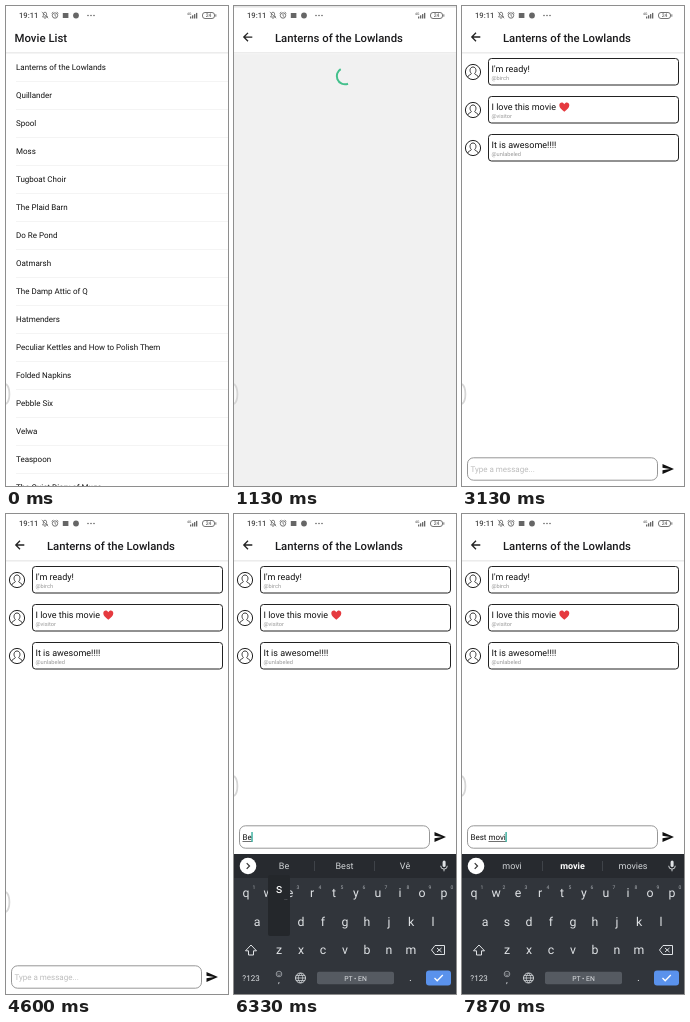
These frames come from a looping animation (222x480 px, 8 s). An HTML page with a canvas:

```html
<!DOCTYPE html>
<html lang="en">
<head>
<meta charset="utf-8">
<title>Movie chat</title>
<style>
html, body { margin: 0; width: 100%; height: 100%; overflow: hidden; background: #fff; }
canvas { display: block; width: 222px; height: 480px; }
</style>
</head>
<body>
<canvas id="stage"></canvas>
<script>
const W = 222, H = 480, LOOP = 8000;
const stage = document.getElementById('stage');
const c = stage.getContext('2d');
const dpr = window.devicePixelRatio || 1;
stage.width = W * dpr;
stage.height = H * dpr;
c.textRendering = 'geometricPrecision';

const movies = ['Lanterns of the Lowlands', 'Quillander', 'Spool', 'Moss', 'Tugboat Choir',
  'The Plaid Barn', 'Do Re Pond', 'Oatmarsh', 'The Damp Attic of Q', 'Hatmenders',
  'Peculiar Kettles and How to Polish Them', 'Folded Napkins', 'Pebble Six', 'Velwa',
  'Teaspoon', 'The Quiet Diary of Mugs'];
const messages = [["I'm ready!", '@birch'], ['I love this movie', '@visitor'],
  ['It is awesome!!!!', '@unlabeled']];
const keyRows = [['qwertyuiop', 12, 379], ['asdfghjkl', 23, 408], ['zxcvbnm', 45, 436]];

// [time, text in the field, three suggestions]
const typing = [
  [0, ''],
  [5930, 'B', 'B', 'Bom', 'Boa'],
  [6130, 'Be', 'Be', 'Best', 'Vê'],
  [6400, 'Bes', 'Bes', 'Best', 'Bem'],
  [6600, 'Best', 'Best', 'Beat', 'Rest'],
  [6800, 'Best ', 'of', 'friend', 'way'],
  [7200, 'Best m', 'm', 'me', 'my'],
  [7470, 'Best mo', 'mo', 'more', 'most'],
  [7730, 'Best mov', 'mov', 'move', 'movie'],
  [7870, 'Best movi', 'movi', 'movie', 'movies']
];
// [down, up, key]
const presses = [[5870, 5930, 'b'], [6070, 6130, 'e'], [6270, 6400, 's'], [6530, 6600, 't'],
  [6730, 6800, ' '], [7130, 7200, 'm'], [7330, 7470, 'o'], [7670, 7730, 'v'], [7800, 7870, 'i']];

const clamp = (v, a = 0, b = 1) => Math.min(b, Math.max(a, v));
const smooth = x => x * x * (3 - 2 * x);

function bezier(x, x1, y1, x2, y2) {
  const at = (s, a, b) => 3 * s * (1 - s) ** 2 * a + 3 * s * s * (1 - s) * b + s ** 3;
  let lo = 0, hi = 1;
  for (let i = 0; i < 24; i++) {
    const mid = (lo + hi) / 2;
    if (at(mid, x1, x2) < x) lo = mid; else hi = mid;
  }
  return at(lo, y1, y2);
}

function rect(x, y, w, h, color) {
  c.fillStyle = color;
  c.fillRect(x, y, w, h);
}

function paint(fill, stroke, width = 1) {
  if (fill) { c.fillStyle = fill; c.fill(); }
  if (stroke) { c.strokeStyle = stroke; c.lineWidth = width; c.stroke(); }
}

function round(x, y, w, h, r, fill, stroke, width) {
  c.beginPath();
  c.roundRect(x, y, w, h, r);
  paint(fill, stroke, width);
}

function circle(x, y, r, fill, stroke, width) {
  c.beginPath();
  c.arc(x, y, r, 0, 2 * Math.PI);
  paint(fill, stroke, width);
}

function path(d, x, y, fill, stroke, width) {
  c.save();
  c.translate(x, y);
  const p = new Path2D(d);
  if (fill) { c.fillStyle = fill; c.fill(p); }
  if (stroke) { c.strokeStyle = stroke; c.lineWidth = width || 1; c.stroke(p); }
  c.restore();
}

function text(s, x, y, size, color, align = 'left', weight = 400) {
  c.font = `${weight} ${size}px Roboto, sans-serif`;
  c.textAlign = align;
  c.fillStyle = color;
  c.fillText(s, x, y);
}

function statusBar() {
  const ink = '#666';
  text('19:11', 13, 12, 7.6, '#444', 'left', 500);
  path('M-2.5 2H2.5L1.6 .6V-1A1.6 1.8 0 0 0 -1.6 -1V.6ZM-.8 3.2H.8M-3.2 -3L3.2 3.2', 39, 9, null, ink, 0.8);
  circle(49, 9.5, 2.7, null, ink, 0.9);
  path('M0 -1.5V.3L1.2 1M-3.4 -2L-1.8 -3.5M3.4 -2L1.8 -3.5', 49, 9.5, null, ink, 0.8);
  rect(56.8, 7, 5.6, 5, ink);
  circle(70, 9.5, 2.9, ink);
  for (let i = 0; i < 3; i++) circle(82 + i * 3, 9.5, 0.8, ink);
  text('4G', 181, 8.5, 3.5, ink, 'left', 500);
  for (let i = 0; i < 4; i++) rect(184 + i * 2, 10.5 - i * 1.2, 1.3, 2 + i * 1.2, ink);
  round(196.5, 6.5, 12, 6, 2.5, null, ink, 0.9);
  rect(209.4, 8.3, 0.9, 2.4, ink);
  text('24', 202.5, 11.4, 5, ink, 'center', 500);
}

function header() {
  rect(0, 0, W, 46, '#fff');
  rect(0, 46, W, 1, '#ececec');
  rect(0, 47, W, 1, '#f4f4f4');
}

function listScreen(t) {
  rect(0, 0, W, H + 12, '#fff');
  header();
  text('Movie List', 8.5, 35.8, 11.4, '#1c1c1e', 'left', 500);
  if (t >= 774) {
    c.save();
    c.beginPath();
    c.rect(0, 47, W, 28);
    c.clip();
    c.globalAlpha = clamp((1250 - t) / 250);
    circle(45, 75, 108 + (t - 800) * 0.5, 'rgba(80,96,92,.11)');
    c.restore();
  }
  movies.forEach((name, i) => {
    const y = 64 + i * 28;
    text(name, 10, y, 8, '#111');
    rect(10, y + 11, W, 0.7, '#f0f0f0');
  });
}

function spinner(t) {
  const phase = (t - 2103) / 1333, turn = Math.floor(phase), u = phase - turn;
  const tail = smooth(clamp(2 * u - 1)) * 0.75;
  const head = smooth(clamp(2 * u)) * 0.75;
  const base = 0.48 + (t - 2330) * 0.00045 + turn * 0.75;
  c.beginPath();
  c.arc(111, 70, 8.2, (base + tail) * 2 * Math.PI, (base + head + 0.05) * 2 * Math.PI);
  paint(null, '#43c08c', 2);
}

function message([body, author], i) {
  const y = 52.5 + i * 38;
  round(26.5, y, 190, 26.5, 3, '#fff', '#222');
  text(body, 29.5, y + 13, 9, '#111');
  text(author, 29.5, y + 21.8, 5.65, '#999');
  circle(11, y + 13.5, 7.6, '#fff', '#222');
  path('M-5.4 5.2C-5 2.8 -2 3.2 -1.7 1.5C-4 -1 -3 -5 0 -5S4 -1 1.7 1.5C2 3.2 5 2.8 5.4 5.2',
    11, y + 13.5, null, '#222', 0.9);
  if (i === 1)
    path('M0 4.7C-3 2.4 -5 .6 -5 -1.8C-5 -4.8 -1.3 -5.5 0 -2.7C1.3 -5.5 5 -4.8 5 -1.8C5 .6 3 2.4 0 4.7Z',
      102.3, 101, '#e53a3f');
}

function inputBar(t, typed) {
  const y = t >= 5130 ? 323 : 463, base = y + 3;
  round(5.5, y - 11.2, 190, 22.4, 6, '#fff', '#8c8c8c', 0.9);
  path('M-5.5 -5L6 0L-5.5 5V1.2L2 0L-5.5 -1.2Z', 206, y, '#111');
  text(typed || 'Type a message...', 8.5, base, 8, typed ? '#111' : '#bdbdbd');
  const width = c.measureText(typed).width;
  const start = c.measureText(typed.slice(0, typed.lastIndexOf(' ') + 1)).width;
  if (width > start) rect(8.5 + start, base + 1.3, width - start, 0.7, '#333');
  if (t >= 5000) rect(8.2 + width, y - 5, 1.2, 10, '#14a08c');
}

function chatScreen(t, typed) {
  const loading = t < 2530;
  rect(0, 0, W, H, loading ? '#f1f1f1' : '#fff');
  header();
  path('M4.3 0H-4M0 -4.2L-4.2 0L0 4.2', 14, 31, null, '#222', 1.3);
  text(movies[0], 41, 35.8, 11.3, '#1c1c1e', 'left', 500);
  if (loading) return spinner(t);
  messages.forEach(message);
  inputBar(t, typed);
}

function toolIcons(ink) {
  circle(43, 352, 3, null, ink, 1.6);
  for (let i = 0; i < 8; i++) {
    const a = i * Math.PI / 4;
    circle(43 + 4 * Math.cos(a), 352 + 4 * Math.sin(a), 0.9, ink);
  }
  circle(75, 352, 4.6, ink);
  for (const [x, y] of [[-2.5, 0], [-1, -2.5], [1.6, -2.3], [2, 2]]) circle(75 + x, 352 + y, 0.9, '#272a2f');
  round(102.5, 347.5, 9.5, 7, 1, null, ink);
  path('M-3 -2.5H3M-3 -.5H3M-1.5 4.5H1.5', 107, 352, null, ink, 1);
  path('M4.5 0V-4.5H-4.5V4.5H0M1 1H5L3 5Z', 139, 352, null, ink, 1.1);
  for (let i = -1; i < 2; i++) circle(179 + i * 3.8, 352, 1, ink);
}

function popup(key, upper) {
  for (const [letters, x0, y] of keyRows) {
    const i = letters.indexOf(key);
    if (i < 0) continue;
    const x = x0 + i * 22;
    round(x - 11, y - 47, 22, 61, 2, '#24272b');
    text(upper ? key.toUpperCase() : key, x, y - 29.5, 13, '#fff', 'center');
    text('…', x + 7, y - 22, 5, '#ccc', 'center');
  }
}

function keyboard(t, [, typed, ...words]) {
  const ink = '#dfe2e5', dim = '#a9adb2', upper = !typed;
  const press = presses.find(([down, up]) => t >= down && t < up);
  c.save();
  c.translate(0, 140 * (1 - clamp((t - 4990) / 310)) ** 2);
  rect(0, 340, W, 140, '#31353b');
  rect(0, 340, W, 24, '#272a2f');

  circle(14, 352, 8.3, '#fff');
  path(upper ? 'M1.3 -2.8L-1.5 0L1.3 2.8' : 'M-1.3 -2.8L1.5 0L-1.3 2.8', 14, 352, null, '#333', 1.2);
  round(208.6, 346.5, 3, 6.5, 1.5, ink);
  path('M-3.3 0A3.3 3.3 0 0 0 3.3 0M0 3.3V5.5', 210, 351.8, null, ink, 0.9);
  if (upper) toolIcons(dim);
  else {
    rect(80, 347, 0.7, 10, '#4b4f55');
    rect(140, 347, 0.7, 10, '#4b4f55');
    const bold = typed === 'Best movi';
    words.forEach((w, i) => {
      const strong = bold && i === 1;
      text(w, 50 + i * 60.5, 355.2, 9, strong ? '#fff' : '#d0d3d6', 'center', strong ? 700 : 400);
    });
  }

  for (const [letters, x0, y] of keyRows)
    [...letters].forEach((k, i) => {
      const x = x0 + i * 22;
      text(upper ? k.toUpperCase() : k, x, y + 4.2, 12.3, ink, 'center');
      if (y === 379) text((i + 1) % 10, x + 8, y - 4.5, 5, dim, 'center');
    });

  path('M0 -5L5.5 .8H2.5V5H-2.5V.8H-5.5Z', 17, 436, upper ? ink : null, ink, 1);
  path('M-6.5 0L-3 -4.5H6.5V4.5H-3ZM-1 -2L3.5 2M3.5 -2L-1 2', 204, 436, null, ink, 1);

  text('?123', 17, 467, 8, ink, 'center');
  circle(45, 460, 2.8, null, dim, 0.8);
  path('M-1.4 .5A1.5 1.5 0 0 0 1.4 .5M-1 -1V-.4M1 -1V-.4', 45, 460, null, dim, 0.7);
  text(',', 45, 468.5, 9, ink, 'center');
  circle(66.5, 464, 5, null, ink, 0.9);
  path('M-5 0H5M-4.3 -2.5H4.3M-4.3 2.5H4.3M0 -5C-3 -2 -3 2 0 5C3 2 3 -2 0 -5', 66.5, 464, null, ink, 0.7);
  round(83, 457.8, 77, 12.4, 2, press && press[2] === ' ' ? '#777c83' : '#555a61');
  text('PT • EN', 121.5, 466.5, 6.8, ink, 'center');
  text('.', 176.5, 467, 11, ink, 'center');
  round(192, 456.5, 25, 15, 3, '#5a92ec');
  path('M-4 0L-1.3 2.8L4.3 -3', 204.5, 464, null, '#fff', 1.3);
  if (press) popup(press[2], upper);
  c.restore();
}

function edgeHandle(t) {
  const y = t >= 5130 ? 272 : 388;
  path('M0 -10C2.8 -8 3.4 -4 3.4 0S2.8 8 0 10', 0, y, 'rgba(255,255,255,.6)', '#d6d6d6', 1.8);
}

function draw() {
  const t = performance.now() % LOOP;
  c.setTransform(dpr, 0, 0, dpr, 0, 0);
  rect(0, 0, W, H, '#fff');

  // The chat card is revealed from below while the list dims and drifts up.
  const p = bezier(clamp((t - 777) / 425), 0.20833, 0.82, 0.25, 1);
  const state = typing.filter(s => s[0] <= t).pop();
  if (p < 0.999) {
    c.save();
    c.translate(0, -0.02 * H * p);
    listScreen(t);
    c.restore();
    rect(0, 0, W, H, `rgba(0,0,0,${0.1 * clamp(p / 0.36)})`);
  }
  if (p > 0) {
    c.save();
    c.beginPath();
    c.rect(0, H * (1 - p), W, H);
    c.clip();
    c.translate(0, 0.041 * H * (1 - p));
    chatScreen(t, state[1]);
    c.restore();
  }
  statusBar();
  if (t >= 4990) keyboard(t, state);
  edgeHandle(t);
  requestAnimationFrame(draw);
}
draw();
</script>
</body>
</html>
```
